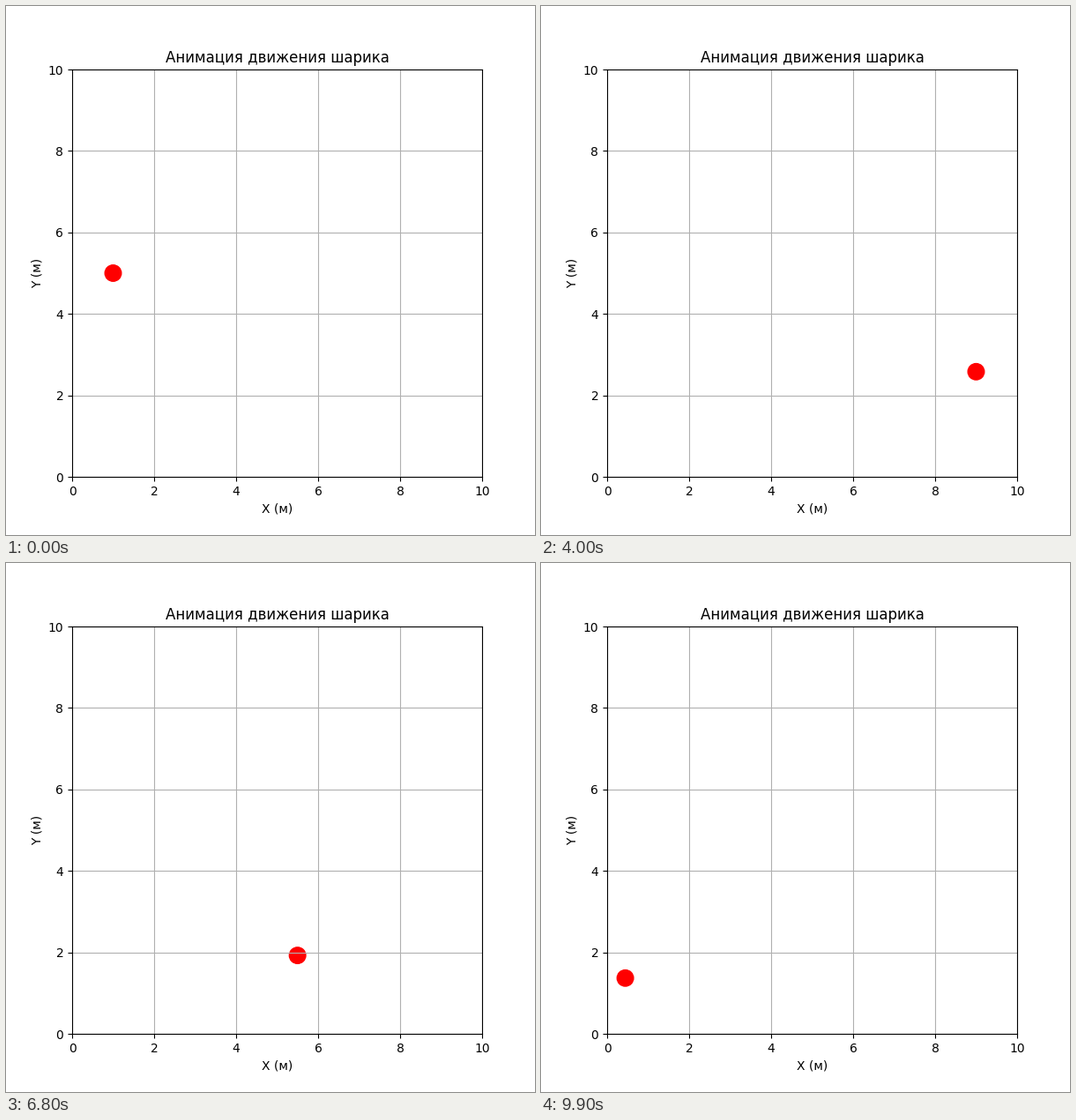
Animation, 600 px wide and 600 px high, one loop 10 s. Source, as a matplotlib script:

```python
import matplotlib.pyplot as plt
from matplotlib.animation import FuncAnimation

SIZE = 10.0       # side of the box, m
RADIUS = 0.2
G = 9.8
BOUNCE = 0.9      # share of speed kept after a hit
DT = 0.01
SUBSTEPS = 10     # physics steps per frame
FRAMES = 100
EPS = 1e-9


def bounce(pos, vel):
    """Keep a coordinate inside the box, reversing the speed at a wall."""
    low, high = RADIUS, SIZE - RADIUS
    if pos < low - EPS:
        return low, -vel * BOUNCE
    if pos > high + EPS:
        return high, -vel * BOUNCE
    return pos, vel


def simulate():
    x, y, vx, vy = 1.0, 5.0, 2.0, 0.0
    path = []
    for _ in range(FRAMES):
        path.append((x, y))
        for _ in range(SUBSTEPS):
            x += vx * DT
            y += vy * DT - G * DT ** 2 / 2
            vy -= G * DT
            x, vx = bounce(x, vx)
            y, vy = bounce(y, vy)
    return path


path = simulate()

fig, ax = plt.subplots(figsize=(6, 6), dpi=100)
ax.set_xlim(0, SIZE)
ax.set_ylim(0, SIZE)
ax.set_xlabel("X (м)")
ax.set_ylabel("Y (м)")
ax.set_title("Анимация движения шарика")
ax.grid(True)

ball = plt.Circle(path[0], RADIUS, color="red")
ax.add_patch(ball)


def update(i):
    ball.center = path[i]
    return (ball,)


anim = FuncAnimation(fig, update, frames=FRAMES, interval=100, repeat=True)
plt.show()
```
